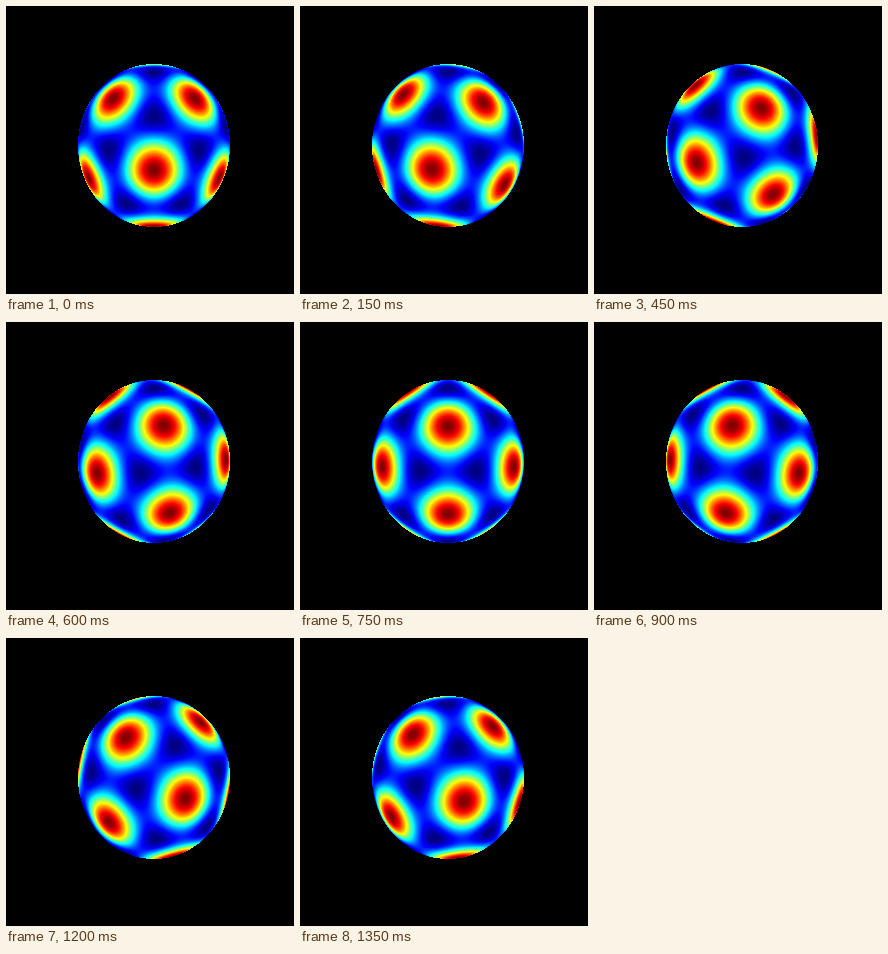
Recreate the animation shown at these times as an HTML page with a canvas. Size 288x288 px, loop 1500 ms.

```html
<!DOCTYPE html>
<html lang="en">
<head>
<meta charset="utf-8">
<title>Icosahedral harmonic</title>
<style>
html, body { margin: 0; width: 100%; height: 100%; overflow: hidden; background: #000; }
canvas { display: block; }
</style>
</head>
<body>
<canvas width="288" height="288"></canvas>
<script>
const SIZE = 288, LOOP = 1500, STEPS = 10;
const CX = 148, CY = 139.5, RX = 76, RY = 81.5;
const TILT = 27.8 * Math.PI / 180, EYE = 25;
const { sin, cos, sqrt, abs, PI } = Math;
const ctx = document.querySelector('canvas').getContext('2d');
const image = ctx.createImageData(SIZE, SIZE);

// Visible surface points: x right, y toward the viewer, z along the spin axis.
const points = [];
const focal = sqrt(EYE * EYE - 1);
for (let py = 0; py < SIZE; py++) {
  for (let px = 0; px < SIZE; px++) {
    const u = (px + 0.5 - CX) / RX, v = (CY - py - 0.5) / RY;
    const r2 = u * u + v * v;
    if (r2 > 1) continue;
    const t = focal * (EYE - sqrt(1 - r2)) / (r2 + focal * focal);
    const up = v * t, near = EYE - focal * t;
    points.push({
      at: 4 * (py * SIZE + px),
      x: u * t,
      y: near * cos(TILT) - up * sin(TILT),
      z: up * cos(TILT) + near * sin(TILT)
    });
  }
}

// Six icosahedron axes, seen along a threefold axis and turned by spin.
function axes(spin) {
  const list = [];
  for (let k = 0; k < 3; k++) {
    for (const [z, start] of [[0.7947, PI / 3], [0.1876, 0]]) {
      const lon = start + k * 2 * PI / 3 - spin, r = sqrt(1 - z * z);
      list.push([r * sin(lon), r * cos(lon), z]);
    }
  }
  return list;
}

const jet = (v, mid) => 255 * (1.5 - abs(4 * v - mid));

function draw(step) {
  const dirs = axes(step / STEPS * 2 * PI / 3);
  const data = image.data;
  for (const p of points) {
    let sum = 0;
    for (const [x, y, z] of dirs) {
      const d = p.x * x + p.y * y + p.z * z, d2 = d * d;
      sum += d2 * d2 * d2;
    }
    // The sum runs from 0.7557 at face centres to 1.04 at vertices.
    const v = (sum - 0.7557) / 0.2843;
    data[p.at] = jet(v, 3);
    data[p.at + 1] = jet(v, 2);
    data[p.at + 2] = jet(v, 1);
    data[p.at + 3] = 255;
  }
  ctx.putImageData(image, 0, 0);
}

let shown = -1;
function frame() {
  const step = Math.floor(performance.now() % LOOP / LOOP * STEPS);
  if (step !== shown) draw(shown = step);
  requestAnimationFrame(frame);
}
frame();
</script>
</body>
</html>
```
